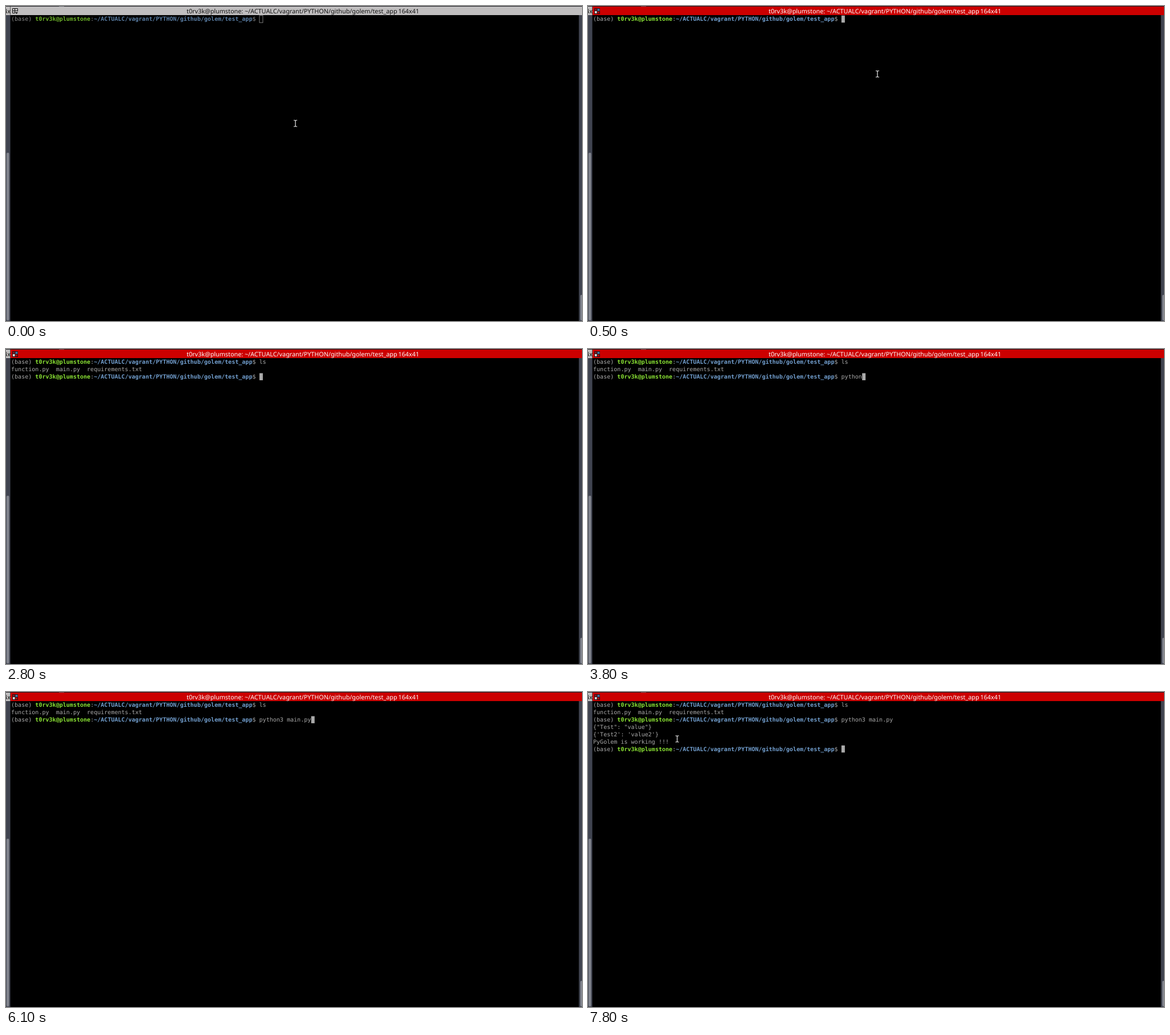
Recreate the animation shown at these times as an HTML page. Size 1011 by 554 pixels, loop 8 s.

```html
<!DOCTYPE html>
<html lang="en">
<head>
<meta charset="utf-8">
<title>Terminal session</title>
<style>
  html, body { margin: 0; width: 100%; height: 100%; overflow: hidden; background: #000; }
  svg { display: block; width: 1011px; height: 554px; }
  text { white-space: pre; text-rendering: geometricPrecision; }
  .term { font: 10.06px "DejaVu Sans Mono", monospace; fill: #aaa; }
  .bold { font-weight: 700; }
  .user { fill: #8ae234; }
  .path { fill: #729fcf; }
  .title { font: 10.8px "Noto Sans", sans-serif; fill: #fff; }
  #bar { fill: #c00; }
  #block { fill: #aaa; }
  .idle #bar { fill: #c0bebf; }
  .idle .title { fill: #111; }
  .idle .term { fill: #888; }
  .idle .user { fill: #6eb52a; }
  .idle .path { fill: #5b7fa6; }
  .idle #block { fill: none; stroke: #888; stroke-width: .9; }
  .idle .focusIcon, svg:not(.idle) .idleIcon { display: none; }
</style>
</head>
<body>
<svg id="stage" viewBox="0 0 1011 554">
  <rect width="1011" height="554"/>
  <rect y="16" width="8" height="538" fill="#404450"/>
  <rect x="7" y="16" width="1" height="538" fill="#24262e"/>
  <rect x="1" y="258" width="4.5" height="295" rx="2" fill="#82858e"/>
  <rect x="1005.5" y="16" width="5.5" height="538" fill="#404450"/>
  <rect x="1008" y="508" width="5" height="45" rx="2" fill="#82858e"/>
  <rect width="1011" height="1" fill="#1c1d22"/>
  <rect x="93" width="9" height="1" fill="#55575e"/>
  <rect y="1" width="7.5" height="15" fill="#c0bebf"/>
  <text class="title" x="-4" y="13" style="fill:#111">4x</text>
  <rect id="bar" x="8" y="1" width="1003" height="15"/>
  <g class="focusIcon">
    <rect x="11" y="4" width="10" height="10" fill="#2b1418"/>
    <rect x="16.5" y="5" width="3.8" height="3.6" fill="#3f78a8"/>
    <rect x="12" y="9" width="3.6" height="3.8" fill="#ddd"/>
    <rect x="16.8" y="9.8" width="3" height="3" fill="#c00"/>
    <rect x="12" y="5" width="3.2" height="3" fill="#8b1820"/>
  </g>
  <g class="idleIcon" fill="none" stroke="#111">
    <path d="M11.5 4.5h9v5M11.5 4.5v8h4M11.5 8.5h9M15.5 4.5v8"/>
    <path d="M16 11h5l-2.5 3z" fill="#111" stroke="none"/>
  </g>
  <text class="title" x="317" y="12.8">t0rv3k@plumstone: ~/ACTUALC/vagrant/PYTHON/github/golem/test_app</text>
  <text class="title" x="688.5" y="12.8">164x41</text>
  <rect id="block" width="6" height="12.4"/>
  <g id="lines"></g>
  <g id="mouse" fill="none" stroke-linecap="square">
    <path id="beam" d="M-2.5 -5.5H-1L0 -4.5L1 -5.5H2.5M0 -4.5V4.5M-2.5 5.5H-1L0 4.5L1 5.5H2.5" stroke="#000" stroke-width="2.6"/>
    <use href="#beam" style="display:none"/>
    <path d="M-2.5 -5.5H-1L0 -4.5L1 -5.5H2.5M0 -4.5V4.5M-2.5 5.5H-1L0 4.5L1 5.5H2.5" stroke="#eee" stroke-width="1.2"/>
  </g>
</svg>
<script>
const LOOP = 8000, LEFT = 9, TOP = 16.6, COL = 6.056, ROW = 12.87, PROMPT_COLS = 72;
const get = id => document.getElementById(id);
const stage = get("stage"), block = get("block"), mouse = get("mouse");

const PROMPT = '(base) <tspan class="bold user">t0rv3k@plumstone</tspan>:' +
  '<tspan class="bold path">~/ACTUALC/vagrant/PYTHON/github/golem/test_app</tspan>$ ';

// [time, value] pairs; each value holds until the next one
const listKeys = [[0, 0], [1300, 1], [1400, 2]];
const runKeys = [[0, 0], [3000, 1], [3300, 2], [3500, 4], [3800, 6], [4300, 7], [4500, 8],
  [4600, 9], [5000, 10], [5200, 12], [5600, 13], [5800, 14], [6100, 15]];
const blink = [[0, 1], [1100, 0], [1200, 1], [2200, 0], [2800, 1], [7000, 0], [7700, 1]];
const pointer = [[0, [508, 206.5]], [200, [515, 160]], [300, [508, 119.5]], [1200, null],
  [7200, [426, 121.5]], [7300, [340.5, 103]], [7500, [204.5, 72.5]],
  [7700, [170, 79]], [7800, [156.5, 82.5]]];

const at = (steps, t) => steps.findLast(([start]) => start <= t)[1];

const rows = [
  { from: 0, html: PROMPT, typed: "ls", keys: listKeys },
  { from: 1600, html: "function.py  main.py  requirements.txt" },
  { from: 1600, html: PROMPT, typed: "python3 main.py", keys: runKeys },
  { from: 6600, html: '{"Test": "value"}' },
  { from: 6600, html: "{'Test2': 'value2'}" },
  { from: 6600, html: "PyGolem is working !!!" },
  { from: 6600, html: PROMPT, typed: "", keys: [[0, 0]] }
];

get("lines").innerHTML = rows.map((row, i) =>
  `<text class="term" x="${LEFT}" y="${TOP + i * ROW + 9.8}">${row.html}<tspan></tspan></text>`).join("");
rows.forEach((row, i) => {
  row.line = get("lines").children[i];
  row.input = row.line.lastElementChild;
});

function draw(t) {
  stage.classList.toggle("idle", t < 500);
  rows.forEach((row, i) => {
    const shown = t >= row.from;
    row.line.style.display = shown ? "" : "none";
    if (!shown || !row.keys) return;
    const count = at(row.keys, t);
    row.input.textContent = row.typed.slice(0, count);
    block.setAttribute("x", LEFT + (PROMPT_COLS + count) * COL - 0.2);
    block.setAttribute("y", TOP + i * ROW + 0.2);
  });
  block.style.display = at(blink, t) ? "" : "none";
  const spot = at(pointer, t);
  mouse.style.display = spot ? "" : "none";
  if (spot) mouse.setAttribute("transform", `translate(${spot})`);
}

const start = performance.now();
function tick() {
  draw((performance.now() - start) % LOOP);
  requestAnimationFrame(tick);
}
draw(0);
requestAnimationFrame(tick);
</script>
</body>
</html>
```
